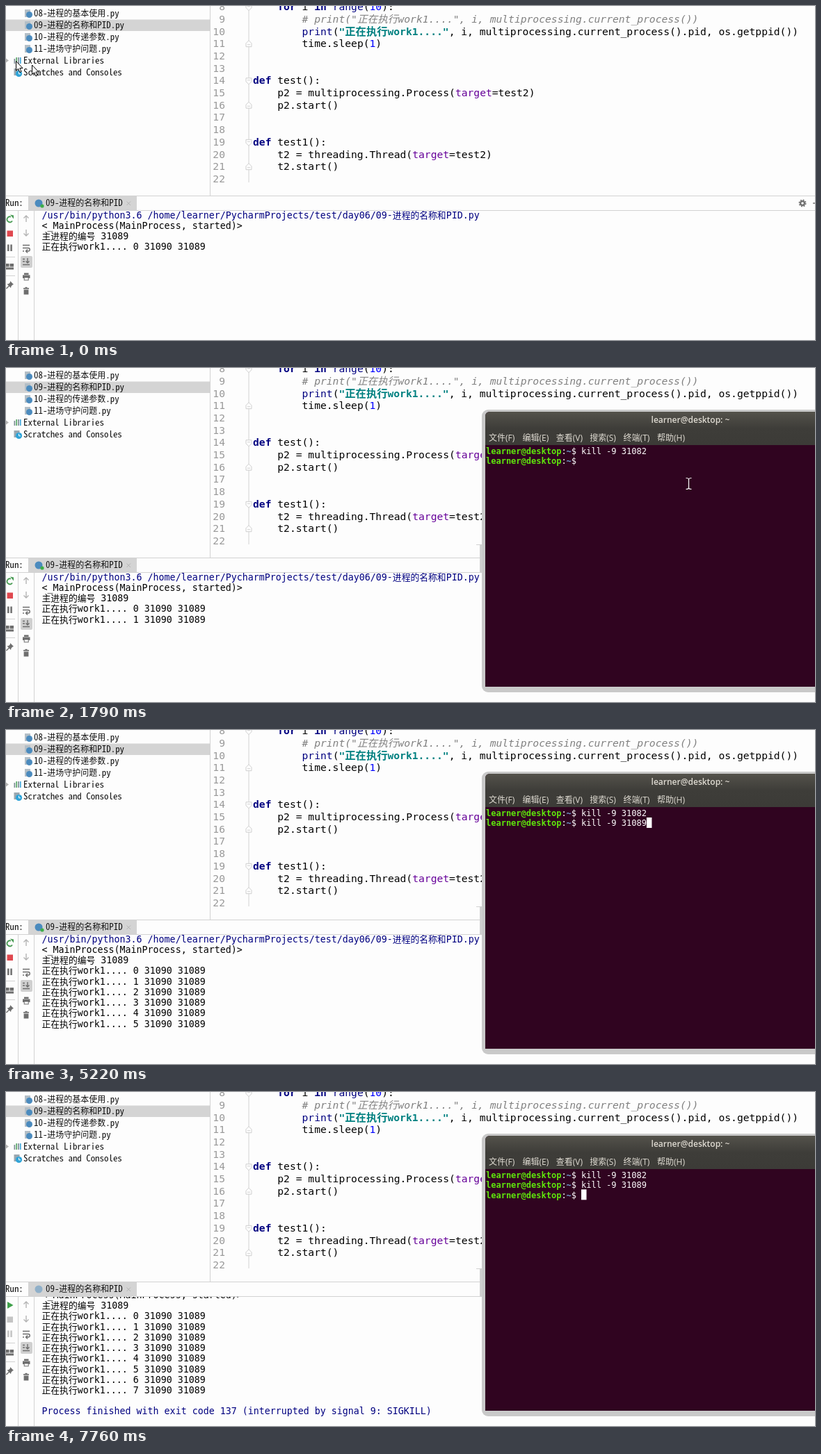
Write an HTML page that moves like this. It is 1163 px wide and 481 px high and loops after 8 s.

```html
<!DOCTYPE html>
<html lang="zh">
<head>
<meta charset="utf-8">
<title>Kill a parent process</title>
<style>
html, body { margin: 0; width: 100%; height: 100%; overflow: hidden; background: #fdfdfd; }
svg { display: block; width: 1163px; height: 481px; }
text { white-space: pre; }
.code, .con, .term { font-family: "DejaVu Sans Mono", "Noto Sans CJK SC", monospace; }
.code { font-size: 14.65px; }
.con { font-size: 13.3px; }
.con .c { font-size: 12.8px; }
.term { font-size: 12px; fill: #fff; }
.tree { font: 12.9px "Noto Sans Mono CJK SC", "Noto Sans CJK SC", monospace; fill: #111; }
.tree .c { font-size: 12px; }
.menu { font: 12px "Open Sans", "Noto Sans CJK SC", sans-serif; fill: #dfdbd2; }
.title { font: 600 12px "Open Sans", sans-serif; fill: #dfdbd2; text-anchor: middle; }
.num { fill: #999; text-anchor: end; }
.key { fill: #000080; font-weight: bold; }
.fn, .nav { fill: #000080; }
.int { fill: #0000ff; }
.arg { fill: #660099; }
.str { fill: #008080; font-weight: bold; }
.str .c { font-size: 15.3px; }
.rem { fill: #808080; font-style: italic; }
.user { fill: #5fe60c; font-weight: bold; }
.dir { fill: #729fcf; font-weight: bold; }
.line { fill: none; stroke: #6e6e6e; stroke-width: 1.4; }
.dim { stroke: #b4b4b4; }
.rule { fill: none; stroke: #d2d2d2; }
</style>
</head>
<body>
<svg id="stage" viewBox="0 0 1163 481" xmlns="http://www.w3.org/2000/svg"></svg>
<script>
const LOOP = 8000;
const stage = document.getElementById('stage');

const han = s => s.replace(/[\u4e00-\u9fff]+/g, m => `<tspan class="c">${m}</tspan>`);
const text = (x, y, s, cls = '') => `<text x="${x}" y="${y}" class="${cls}">${han(s)}</text>`;
const span = (cls, s) => `<tspan class="${cls}">${s}</tspan>`;
const rect = (x, y, w, h, fill, more = '') =>
  `<rect x="${x}" y="${y}" width="${w}" height="${h}" fill="${fill}" ${more}/>`;
const path = (d, cls = 'line', more = '') => `<path d="${d}" class="${cls}" ${more}/>`;
const dot = (x, y, r, fill) => `<circle cx="${x}" cy="${y}" r="${r}" fill="${fill}"/>`;
const group = (id, s, more = '') => `<g id="${id}" ${more}>${s}</g>`;

function tree() {
  const files = ['08-进程的基本使用.py', '09-进程的名称和PID.py', '10-进程的传递参数.py', '11-进场守护问题.py'];
  let s = rect(0, 19.5, 293, 16.5, '#d4d4d4');
  files.forEach((name, i) => {
    const y = 11 + 17 * i;
    s += rect(27, y - 6, 8, 11, '#b3bec6') + dot(33.5, y + 1.5, 4.5, '#4b8bbe') + text(40, y + 4.3, name, 'tree');
  });
  s += path('M0 75.5L4 78.5L0 81.5Z', '', 'fill="#b5b5b5"');
  ['#7d8b94', '#59a869', '#7d8b94', '#40a5d8'].forEach((c, i) => {
    s += rect(11.5 + 2.8 * i, i === 0 ? 76 : 74, 1.7, i === 0 ? 7 : 9, c);
  });
  s += rect(11.5, 90, 8, 10, '#9aa7b0') + dot(18.5, 97.5, 4.6, '#30a4d8') +
    path('M18.5 94.8V97.8H21', '', 'fill="none" stroke="#fff"');
  return s + text(25, 83.3, 'External Libraries', 'tree') + text(25, 100.3, 'Scratches and Consoles', 'tree');
}

function editor() {
  const def = name => span('key', 'def') + ` ${name}():`;
  const code = {
    8: [4, span('key', 'for') + ' i ' + span('key', 'in') + ' ' + span('fn', 'range') + '(' + span('int', '10') + '):'],
    9: [8, span('rem', '# print("正在执行work1....", i, multiprocessing.current_process())')],
    10: [8, span('fn', 'print') + '(' + span('str', '"正在执行work1...."') +
      ', i, multiprocessing.current_process().pid, os.getppid())'],
    11: [8, 'time.sleep(' + span('int', '1') + ')'],
    14: [0, def('test')],
    15: [4, 'p2 = multiprocessing.Process(' + span('arg', 'target') + '=test2)'],
    16: [4, 'p2.start()'],
    19: [0, def('test1')],
    20: [4, 't2 = threading.Thread(' + span('arg', 'target') + '=test2)'],
    21: [4, 't2.start()']
  };
  const lineY = n => 112.3 + 17.7 * (n - 14);
  let s = path('M293.5 0V273', 'rule') + path('M349 0V254', 'rule');
  for (const [n, up] of [[8, 0], [14, 0], [19, 0], [11, 1], [16, 1], [21, 1]]) {
    const y = lineY(n) - 4.5, k = up ? -1 : 1;
    s += path(`M345 ${y - 4 * k}H353V${y + k}L349 ${y + 5 * k}L345 ${y + k}Z`, '', 'fill="#fdfdfd" stroke="#cfcfcf"') +
      path(`M347 ${y - k}H351`, 'rule');
  }
  for (let n = 8; n <= 22; n++) {
    s += text(315, lineY(n), String(n), 'code num');
    if (code[n]) s += text(355 + 8.82 * code[n][0], lineY(n), code[n][1], 'code');
  }
  return s;
}

function runPanel() {
  let s = rect(0, 273, 1163, 208, '#fdfdfd') + rect(32, 274, 156, 20, '#d4d4d4') +
    path('M0 273.5H1163M0 294.5H1163M17.5 295V481M40.5 295V481', 'rule') +
    text(-1, 288.3, 'Run:', 'tree') + text(57, 288.3, '09-进程的名称和PID', 'tree') +
    path('M173.5 281.5L179 287M179 281.5L173.5 287', 'line dim', 'style="stroke-width:1"');
  s += group('logo', dot(47, 284, 5.5, '#4b8bbe')) + group('live', dot(52, 288, 2.6, '#3fae49'));
  // gear and hide button
  s += '<circle cx="1145" cy="284" r="2.9" fill="none" stroke="#6e6e6e" stroke-width="2.2"/>' +
    '<circle cx="1145" cy="284" r="4.7" fill="none" stroke="#6e6e6e" stroke-width="1.6" stroke-dasharray="1.9 1.79"/>' +
    path('M1160 284H1163');
  // left tool column
  s += group('rerun', path('M9 309.5A4 4 0 1 1 7 303.6', 'line', 'style="stroke:#499c54;stroke-width:1.8"') +
    path('M6 300.5L11 301.5V306.5Z', '', 'fill="#499c54"') + rect(1.5, 323.5, 8.5, 8.5, '#e0484f'));
  s += group('idle', path('M2 302L10.5 307L2 312Z', '', 'fill="#3fa04a"') + rect(1.5, 323.5, 8.5, 8.5, '#c4c4c4'));
  s += group('pause', rect(2, 343.5, 2.5, 9.5, '#6e6e6e') + rect(6.3, 343.5, 2.5, 9.5, '#6e6e6e'));
  s += path('M0 361.5H13M0 388.5H13', 'rule') +
    rect(0, 371, 4.5, 4.5, '#6e6e6e') + rect(5.5, 371, 5.5, 4.5, '#6e6e6e') + rect(0, 376.5, 11, 3, '#6e6e6e') +
    path('M6 396L11 401L9.5 401.5L7.5 403.5L7 406L1.5 400.5L4 400L6 398Z', '', 'fill="#6e6e6e"') +
    path('M4.5 403L0.5 407');
  // right tool column
  s += path('M29 311V302M25.5 305.5L29 302L32.5 305.5M29 322V331M25.5 327.5L29 331L32.5 327.5', 'line dim') +
    path('M24 344.5H34M24 348.5H32A2.2 2.2 0 0 1 32 353H29M31 350.5L28.5 353L31 355.5M24 353H26') +
    rect(21, 360, 17, 17, '#d0d0d0', 'rx="2"') +
    path('M24 372.5H34M24 364.5H27M24 368H27M31 363V370M28.5 367.5L31 370L33.5 367.5') +
    rect(26, 384.5, 6.5, 2.5, '#6e6e6e') + rect(24, 387.5, 10.5, 4.5, '#6e6e6e') +
    rect(26.2, 391, 6, 3.8, '#fdfdfd', 'stroke="#6e6e6e"') +
    rect(25, 406, 8, 1.6, '#6e6e6e') + rect(27.5, 404.8, 3, 1.5, '#6e6e6e') + rect(25.6, 408.5, 6.8, 7, '#6e6e6e');
  return s;
}

function consoleText() {
  const lines = [
    span('nav', '/usr/bin/python3.6 /home/learner/PycharmProjects/test/day06/09-进程的名称和PID.py'),
    '&lt;_MainProcess(MainProcess, started)&gt;',
    '主进程的编号 31089'
  ];
  for (let i = 0; i < 8; i++) lines.push(`正在执行work1.... ${i} 31090 31089`);
  lines.push('', span('nav', 'Process finished with exit code 137 (interrupted by signal 9: SIGKILL)'));
  const s = lines.map((l, i) => `<g class="row">${text(51.5, 305.7 + 15.23 * i, l, 'con')}</g>`).join('');
  return `<g clip-path="url(#pane)">${group('scroll', s)}</g>`;
}

const rowY = i => 123.7 + 14.5 * i;
const prompt = i => text(690, rowY(i), span('user', 'learner@desktop') + ':' + span('dir', '~') + '$ ', 'term');

function terminal() {
  const menu = ['文件(F)', '编辑(E)', '查看(V)', '搜索(S)', '终端(T)', '帮助(H)'];
  let s = path('M676 254.5H688', 'rule') + rect(681, 254, 8, 40, '#d0d0d0') +
    rect(684, 60, 500, 407, '#c9c9c9', 'rx="9"') +
    path('M689 459V70Q689 63 696 63H1163V459Z', '', 'fill="#300420"') +
    path('M689 111V70Q689 63 696 63H1163V111Z', '', 'fill="url(#bar)"') +
    text(984, 79, 'learner@desktop: ~', 'title');
  menu.forEach((m, i) => { s += text(694 + 48.4 * i, 104.5, m, 'menu'); });
  return s + prompt(0) + text(827, rowY(0), 'kill -9 31082', 'term') + prompt(1) +
    '<text id="typed" x="827" y="' + rowY(1) + '" class="term"></text>' +
    group('next', prompt(2)) + rect(827, 126, 7.5, 15, '#fff', 'id="caret"');
}

const tip = rect(-20, 52, 46.5, 24.5, '#808080', 'rx="5"') +
  text(-6, 69, '终端', 'menu');
const arrow = (x, y) => path(`M${x} ${y}V${y + 13.5}L${x + 3} ${y + 10.8}L${x + 5.4} ${y + 16}L${x + 7.6} ${y + 15}` +
  `L${x + 5.3} ${y + 10}H${x + 9.5}Z`, '', 'fill="#fff" stroke="#000"');
const beam = (x, y) => path(`M${x - 4} ${y - 8}Q${x} ${y - 8} ${x} ${y - 6}V${y + 6}Q${x} ${y + 8} ${x - 4} ${y + 8}` +
  `M${x + 4} ${y - 8}Q${x} ${y - 8} ${x} ${y - 6}M${x} ${y + 6}Q${x} ${y + 8} ${x + 4} ${y + 8}`, '',
  'fill="none" stroke="#fff" stroke-width="1.2"');

stage.innerHTML = `<defs>
  <clipPath id="pane"><rect x="41" y="295" width="1122" height="186"/></clipPath>
  <linearGradient id="bar" x2="0" y2="1"><stop stop-color="#54524b"/><stop offset=".5" stop-color="#3e3d39"/>
  <stop offset="1" stop-color="#3c3b37"/></linearGradient></defs>` +
  rect(0, 0, 1163, 481, '#fdfdfd') + tree() + editor() + runPanel() + consoleText() +
  group('window', terminal()) + group('tip', tip) + group('mouse', '');

const el = id => document.getElementById(id);
const rows = [...stage.querySelectorAll('.row')];
const show = (node, on) => node.setAttribute('visibility', on ? 'inherit' : 'hidden');

const OPEN = 750, ENTER = 6570, STOP = 6720, DONE = 7310;
const prints = [0, 900, 1940, 2830, 4320, 5220, 5820, DONE];
const typing = [[0, ''], [1940, 'kill -9 31082'], [2680, 'kill -9 3108'], [3720, 'kill -9 310'],
  [4920, 'kill -9 3108'], [5220, 'kill -9 31089']];
const blinks = [[1350, 1940], [2530, 2680], [3270, 3720], [4320, 4920], [5820, 6420], [7160, 7760]];
const mouse = [[0, arrow(14.5, 79.5) + arrow(37.5, 85)], [150, arrow(-1, 77)], [300, ''], [900, beam(819.5, 150)],
  [1050, beam(931.5, 183) + beam(943.5, 189.5)], [1200, beam(969, 180.5) + beam(978.5, 168)],
  [1350, beam(981.5, 167.5)], [1790, beam(981.5, 166.5)], [1940, '']];
const at = (steps, t) => steps.filter(s => s[0] <= t).pop()[1];

let pointer = null;
function draw(t) {
  const printed = prints.filter(p => p <= t).length;
  rows.forEach((r, i) => show(r, i < 3 + printed || t >= DONE));
  el('scroll').setAttribute('transform', `translate(0 ${t >= DONE ? -24 : 0})`);

  const stopped = t >= STOP;
  show(el('live'), !stopped);
  show(el('rerun'), !stopped);
  show(el('idle'), stopped);
  el('logo').setAttribute('opacity', stopped ? 0.5 : 1);
  el('pause').setAttribute('opacity', t >= DONE ? 0.4 : 1);

  const cmd = at(typing, t), entered = t >= ENTER;
  show(el('window'), t >= OPEN);
  el('typed').textContent = cmd;
  show(el('next'), entered);
  show(el('caret'), !blinks.some(([a, b]) => t >= a && t < b));
  el('caret').setAttribute('x', 827 + (entered ? 0 : 7.224 * cmd.length));
  el('caret').setAttribute('y', entered ? 140.3 : 126);

  show(el('tip'), t >= OPEN && t < 1050);
  el('tip').setAttribute('opacity', t < 900 ? 0.95 : 0.25);
  const next = at(mouse, t);
  if (next !== pointer) el('mouse').innerHTML = pointer = next;
}

const start = performance.now();
function tick() {
  draw((performance.now() - start) % LOOP);
  requestAnimationFrame(tick);
}
draw(0);
requestAnimationFrame(tick);
</script>
</body>
</html>
```
